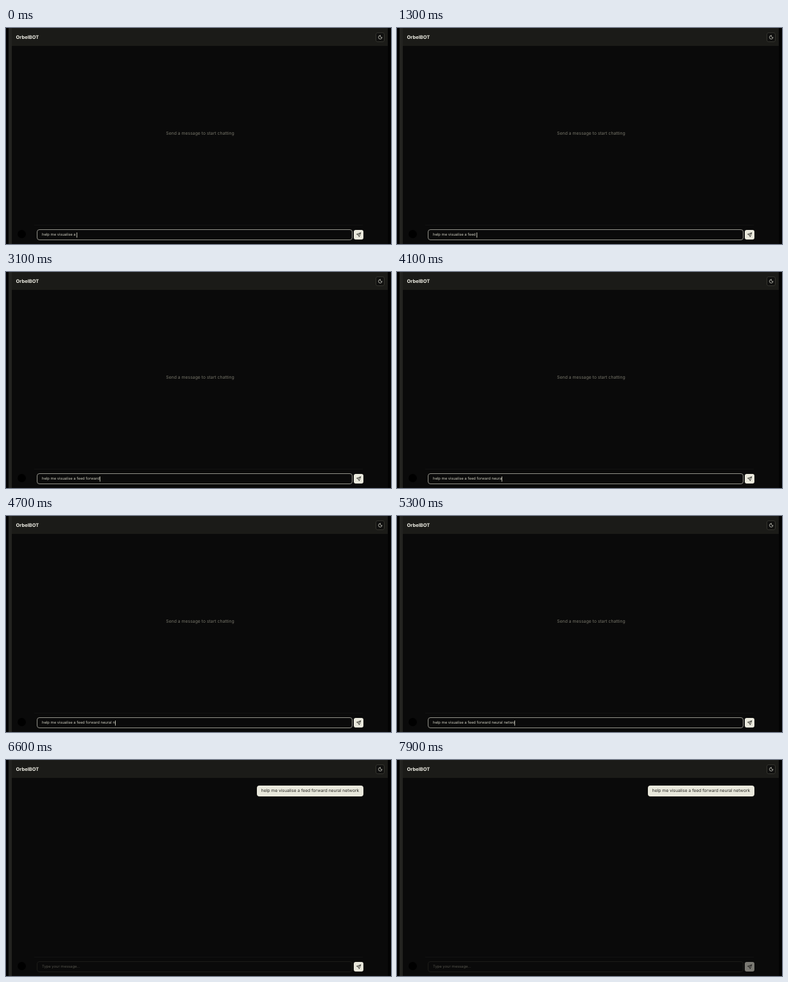
An HTML page for the animation above (8 s loop, 600x338 px).

```html
<!DOCTYPE html>
<html lang="en">
<head>
<meta charset="utf-8">
<title>Chat</title>
<style>
  html, body { margin: 0; width: 100%; height: 100%; overflow: hidden; background: #0a0a0a; }
  #stage {
    position: relative; width: 600px; height: 338px; overflow: hidden;
    background: #0a0a0a;
    font-family: Inter, "Open Sans", sans-serif;
    text-rendering: geometricPrecision;
  }
  #stage > * { position: absolute; box-sizing: border-box; }
  .edge { left: 0; top: 0; width: 4px; height: 338px; background: #030303; }
  .edge.right { left: 595px; width: 5px; }
  .rail { left: 4px; top: 0; width: 5px; height: 338px; background: #232320; }
  .header { left: 9px; top: 0; width: 586px; height: 27.5px; background: #1b1b18; }
  .title { left: 15.5px; top: 9px; font: 700 7.5px/11px Inter, sans-serif; color: #f0efe6; }
  .theme { left: 575.5px; top: 7px; width: 14.5px; height: 14.5px; border: .6px solid #33332d; border-radius: 3px; background: #10100f; }
  .hint { left: 9px; top: 158.5px; width: 587px; text-align: center; font-size: 6.85px; line-height: 11px; color: #77766a; }
  .divider { left: 44px; top: 308px; width: 512px; height: 1px; background: #121211; }
  .badge { left: 18px; top: 316px; width: 13px; height: 13px; border-radius: 50%; background: #000; }
  .input {
    left: 48px; top: 315px; width: 491.5px; height: 17px;
    border: .8px solid #93928a; border-radius: 4px;
    padding-left: 7px; font-size: 5.87px; line-height: 15px;
    white-space: pre; color: #cfcec0;
  }
  .caret { position: absolute; top: 4px; width: 0; height: 7.5px; border-left: 1px solid #b5b4a8; }
  .placeholder { display: none; color: #55544c; }
  .send { left: 542px; top: 315.5px; width: 15px; height: 15px; border-radius: 3px; background: #e9e8dc; }
  .bubble {
    left: 391px; top: 40px; width: 166px; height: 16.5px; border-radius: 4px;
    background: #e9e8dc; color: #24241f; text-align: center;
    font-size: 6.73px; line-height: 16.5px; visibility: hidden;
  }
  svg { display: block; fill: none; stroke-linecap: round; stroke-linejoin: round; }
  .sent .bubble { visibility: visible; }
  .sent .hint { visibility: hidden; }
  .sent .input { border-color: #1c1c19; }
  .sent .typing { display: none; }
  .sent .placeholder { display: inline; }
</style>
</head>
<body>
<div id="stage">
  <div class="edge"></div>
  <div class="edge right"></div>
  <div class="rail"></div>
  <div class="header"></div>
  <div class="title">OrbelBOT</div>
  <div class="theme">
    <svg width="12.5" height="12.5" viewBox="0 0 12.5 12.5" stroke="#dddcd0" stroke-width=".75">
      <path d="M6.2 3.7a2.1 2.1 0 0 0 2.8 2.8a2.8 2.8 0 1 1-2.8-2.8z"/>
    </svg>
  </div>
  <div class="hint">Send a message to start chatting</div>
  <div class="bubble"></div>
  <div class="divider"></div>
  <div class="badge"></div>
  <div class="input"><span class="typing"><span id="text"></span><i class="caret"></i></span><span class="placeholder">Type your message...</span></div>
  <div class="send">
    <svg width="15" height="15" viewBox="0 0 15 15" stroke="#24241f" stroke-width=".8">
      <path d="M10.5 4.5L4.4 6.7L7.1 7.9L8.3 10.6ZL7.1 7.9"/>
    </svg>
  </div>
</div>
<script>
  const LOOP = 8000, SEND = 6600, FADE = 200;
  const start = "help me visualise a ";
  const rest = "feed forward neural network";
  // When each further character is typed
  const keys = [
    300, 500, 700, 1000, 1300, 1500, 1600, 2000, 2400, 2700, 3000, 3100, 3300,
    3500, 3700, 3800, 4000, 4100, 4200, 4400, 4600, 4800, 5000, 5100, 5300, 5500, 5800
  ];
  const find = s => document.querySelector(s);
  const stage = find("#stage"), text = find("#text"), button = find(".send");
  find(".bubble").textContent = start + rest;

  function draw(t) {
    const typed = keys.filter(k => k <= t).length;
    const value = start + rest.slice(0, typed);
    if (text.textContent !== value) text.textContent = value;
    stage.classList.toggle("sent", t >= SEND);
    const fade = Math.min(1, Math.max(0, (t - SEND) / FADE));
    button.style.opacity = 1 - fade / 2;
  }

  const t0 = performance.now();
  function tick() {
    draw((performance.now() - t0) % LOOP);
    requestAnimationFrame(tick);
  }
  tick();
</script>
</body>
</html>
```
